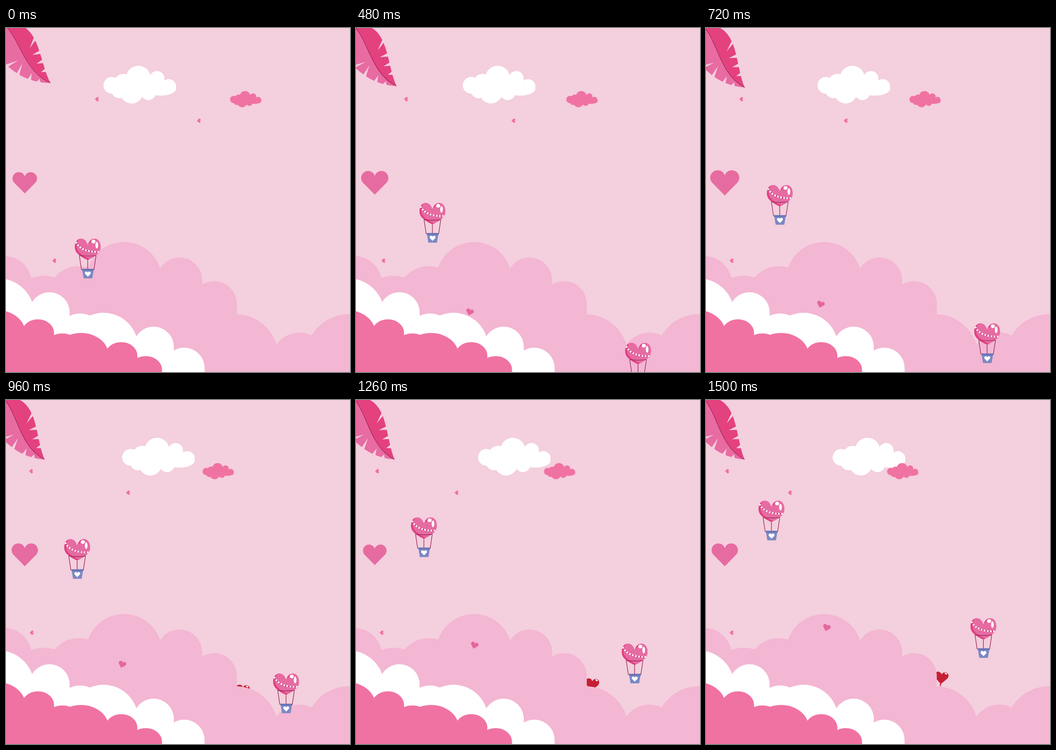
An HTML page for the animation above (1.53 s loop, 720 by 720 pixels).

```html
<!DOCTYPE html>
<html lang="en">
<head>
<meta charset="utf-8">
<title>Heart balloons</title>
<style>
html, body { margin: 0; width: 100%; height: 100%; overflow: hidden; background: #f4cfdd; }
svg { display: block; width: 100vw; height: 100vh; }
</style>
</head>
<body>
<svg viewBox="0 0 720 720">
  <defs>
    <path id="heart" d="M0 22.75 L-22.4 0 A13.25 13.25 0 1 1 0 -13 A13.25 13.25 0 1 1 22.4 0Z"/>
    <path id="puff" d="M27 13 C30 5 34 0 41 0 C49 0 54 7 54 17 C54 31 42 37 27 45 C12 37 0 31 0 17 C0 7 5 0 13 0 C20 0 24 5 27 13Z"/>
    <clipPath id="puffClip"><use href="#puff"/></clipPath>
    <g id="cloud"><ellipse cx="76" cy="45" rx="60" ry="18"/><ellipse cx="120" cy="48" rx="32" ry="14.5"/></g>
    <g id="bank"></g>
    <g id="balloon">
      <use href="#puff" fill="#e23f80"/>
      <g clip-path="url(#puffClip)">
        <use href="#puff" fill="#e66ba2" transform="translate(4 -2)"/>
        <path id="string" d="M2 7 Q13 29 53 27.5" fill="none" stroke="#b62c64"/>
        <use href="#string" stroke="#fff" style="stroke: #fff" />
        <path d="M2 7 Q13 29 53 27.5" fill="none" stroke="#fff" stroke-width="3.4" stroke-dasharray="3.4 3.2"/>
      </g>
      <ellipse cx="39" cy="6" rx="4.2" ry="3.7" fill="#fff"/>
      <ellipse cx="46" cy="13.5" rx="2.8" ry="7" fill="#fff"/>
      <path d="M9 35 Q27 37.5 45 35 M9.5 35 L14 65 M44.5 35 L40 65 M27 45 V64" fill="none" stroke="#8f2350" stroke-width="1.2"/>
      <path d="M15.5 65 H39.5 L36.5 83 H18.5Z" fill="#7c88c3"/>
      <path d="M15 63 H40 V66.5 H15Z" fill="#6673b4"/>
      <use href="#heart" fill="#fff" transform="translate(27.3 74) scale(.24)"/>
    </g>
  </defs>
  <rect width="720" height="720" fill="#f4cfdd"/>
  <g id="leaf"></g>
  <use id="whiteCloud" href="#cloud" fill="#fff"/>
  <use id="pinkCloud" href="#cloud" fill="#f072a2"/>
  <use id="pulse" href="#heart" fill="#e66ba0"/>
  <g id="redBalloon">
    <use href="#heart" fill="#c51f35" transform="translate(0 13) rotate(5) scale(.57)"/>
    <path d="M-2 24 L-4 28 H0Z" fill="#c51f35"/>
    <path d="M-2 27 V60" stroke="#8a1a2b" stroke-width=".8"/>
    <ellipse cx="9.5" cy="3.8" rx="2.8" ry="1.5" fill="#fff" transform="rotate(30 9.5 3.8)"/>
  </g>
  <g id="backBank" fill="#f3b6d3"></g>
  <use href="#bank" fill="#fff"/>
  <use href="#bank" fill="#f072a2" transform="translate(-6 243.1) scale(.8 .663)"/>
  <g fill="#f0709f">
    <use id="topHeart" href="#heart"/>
    <use id="midHeart" href="#heart"/>
    <use id="lowHeart" href="#heart"/>
  </g>
  <use id="riseHeart" href="#heart" fill="#e5669f"/>
  <use id="balloonA" href="#balloon"/>
  <use id="balloonB" href="#balloon"/>
</svg>
<script>
const LOOP = 1530, STEP = 30, SKY = '#f4cfdd';
const $ = id => document.getElementById(id);

function add(parent, tag, attrs) {
  const el = document.createElementNS('http://www.w3.org/2000/svg', tag);
  for (const k in attrs) el.setAttribute(k, attrs[k]);
  parent.appendChild(el);
}

// Each bump is a round-topped column: centre, top, radius
function bumps(id, list, height) {
  for (const [cx, y, r] of list)
    add($(id), 'rect', { x: cx - r, y, width: 2 * r, height: height || 2 * r, rx: r });
}

bumps('cloud', [[17.5, 23.5, 17.5], [42, 17, 21], [73, 0, 26], [112, 11, 15.5],
  [136.5, 28, 15.5], [33, 36, 16], [59, 31, 24], [94, 40, 16]]);
bumps('bank', [[-16, 524, 75], [91, 553, 42.2], [155, 597.5, 49], [204, 596, 72.7],
  [309, 625, 42.2], [373, 669, 42.7]], 900);
bumps('backBank', [[-4, 477, 58], [79, 518.5, 72], [152, 498.5, 65], [247, 448, 79.3], [363, 480.5, 47.5],
  [435.5, 530, 47.5], [480, 599, 90], [614, 637.5, 58], [718, 599, 91]], 900);

// Leaf: three curves meeting at the tip, with notches cut toward the rib
const TIP = [93, 115];
const rib = [[3, 0], [31, 32], [42, 94], TIP];
const rightEdge = [[38, -2], [71, 18], [74, 80], TIP];
const leftEdge = [[-20, 55], [5, 85], [38, 115], TIP];

const lerp = (a, b, k) => a.map((v, i) => v + (b[i] - v) * k);
function at(curve, t) {
  while (curve.length > 1) curve = curve.slice(1).map((p, i) => lerp(curve[i], p, t));
  return curve[0];
}

function notch(edge, t, depth) {
  const inner = lerp(at(edge, t), at(rib, Math.max(t, .5)), depth);
  const a = lerp(inner, at(edge, t - .025), 1.1), b = lerp(inner, at(edge, t + .025), 1.1);
  add($('leaf'), 'path', { d: `M${inner} L${a} L${b}Z`, fill: SKY });
}

function half(edge, fill) {
  const [a, b, c, d] = edge;
  add($('leaf'), 'path', { fill, d: `M-24 -32 L${a} C${b} ${c} ${d} C${rib[2]} ${rib[1]} ${rib[0]}Z` });
}

half(leftEdge, '#e86ba2');
half(rightEdge, '#e4417f');
for (const t of [.27, .5, .7, .84]) notch(leftEdge, t, .62);
for (const t of [.28, .5, .64, .78]) notch(rightEdge, t, .5);
add($('leaf'), 'path', { d: `M-24 -32 L${rib[0]} C${rib.slice(1).join(' ')}`, fill: 'none', stroke: '#8f1d4d' });

function place(id, x, y, rest = '') {
  $(id).setAttribute('transform', `translate(${x} ${y}) ${rest}`);
}

const after = (t, t0) => Math.max(0, t - t0) ** 2;
const glide = t => .1544 * t - 1e-5 * after(t, 900);
const slowTo = (from, to, t, dur) => to + (from - to) * Math.max(0, 1 - t / dur) ** 1.67;

function draw(t) {
  const swing = (1 - Math.cos(Math.PI * Math.min(1, t / 780))) / 2;
  $('leaf').setAttribute('transform', `rotate(${4.5 * swing} -35 -35)`);

  place('whiteCloud', 204 + .0407 * t, 79);
  place('pinkCloud', 469 - .06 * t, 132, 'scale(.43)');

  const pulse = 1.065 - .112 * Math.cos(2 * Math.PI * (t - 150) / 1080);
  place('pulse', 39.25, 323.75, `scale(${pulse})`);

  const small = 'rotate(90) scale(.175)';
  place('topHeart', slowTo(190, 44, t, 1170), 149, small);
  place('midHeart', 403.5 - glide(t), 194, small);
  place('lowHeart', slowTo(101, 53.5, t, 610), 487, small);

  const rise = 7.7e-5 * after(t, 165) - 4e-5 * after(t, 960);
  place('riseHeart', 237 + .122 * rise, 602.4 - rise, 'rotate(18) scale(.31)');
  $('riseHeart').setAttribute('visibility', t < 165 ? 'hidden' : 'visible');

  const up = 1.01 * glide(t);
  place('balloonA', 144 - .148 * up, 441 - up);

  const lift = .103 * t + 6.53e-5 * t * t - 1.06e-8 * t ** 3;
  place('balloonB', 566.4 - .0484 * lift, 722.3 - lift);

  const peek = 2.67e-5 * after(t, 293);
  place('redBalloon', 496.5 - .103 * peek, 607.8 - peek);
}

let start;
function tick(now) {
  if (start === undefined) start = now;
  const t = (now - start) % LOOP;
  draw(Math.floor(t / STEP) * STEP);
  requestAnimationFrame(tick);
}
draw(0);
requestAnimationFrame(tick);
</script>
</body>
</html>
```
